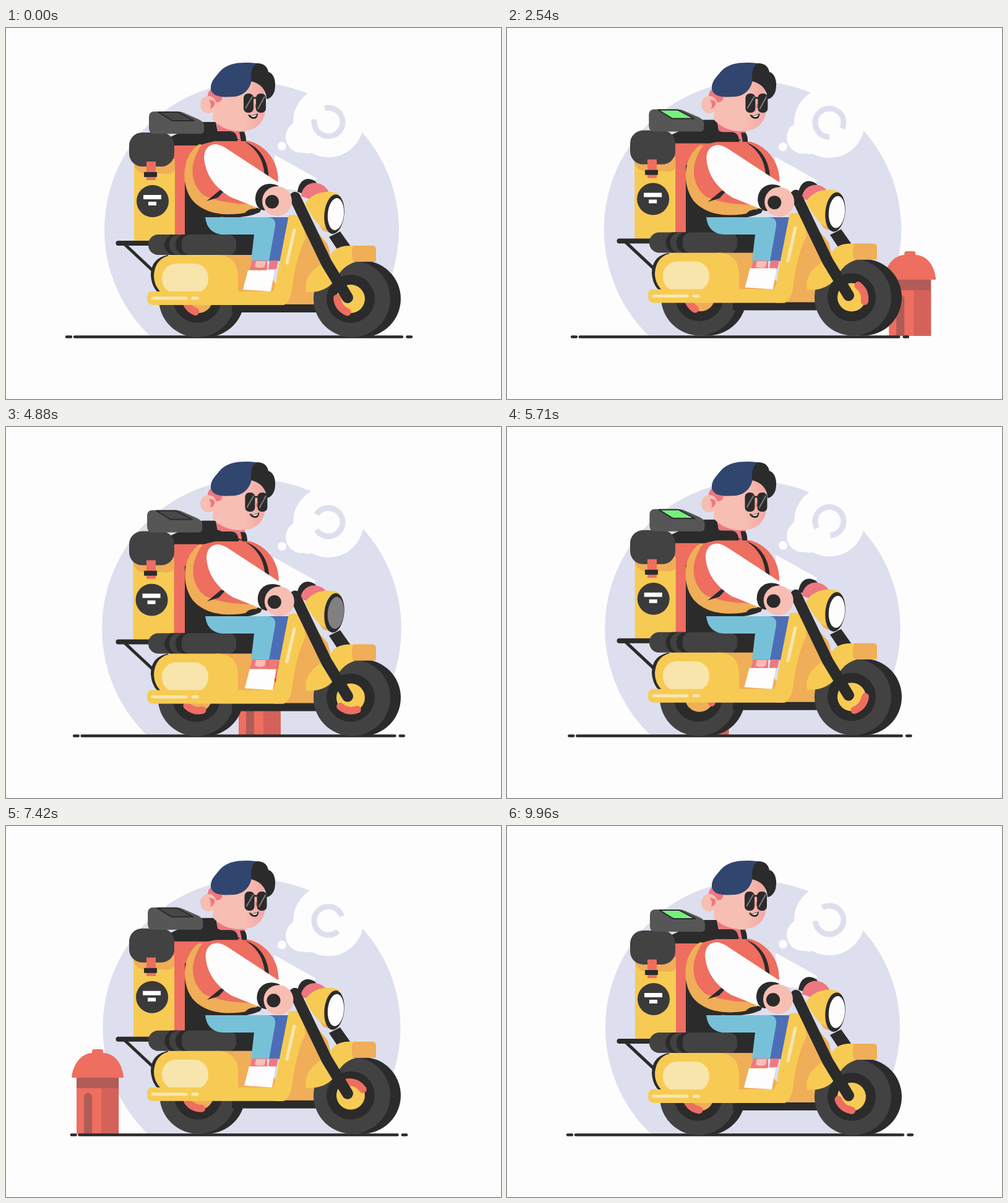
Recreate the animation shown at these times as an HTML page. Size 800 px wide and 600 px high, loop 10000 ms.

```html
<!DOCTYPE html>
<html lang="en">
<head>
<meta charset="utf-8">
<title>Delivery scooter</title>
<style>
  html, body { margin: 0; width: 100%; height: 100%; overflow: hidden; background: #fdfdfd; }
  svg { display: block; width: 100vw; height: 100vh; }
  .bg { fill: #fdfdfd; }
  .halo { fill: #dddfee; }
  .dark { fill: #2b2b2b; }
  .grey { fill: #424242; }
  .yellow { fill: #f7cb53; }
  .orange { fill: #efae57; }
  .pale { fill: #f8e5ab; }
  .red { fill: #ee6e60; }
  .skin { fill: #f7beb3; }
  .blush { fill: #ee7880; }
  .brown { fill: #b05c57; }
  .line { fill: none; stroke: #2b2b2b; stroke-linecap: round; stroke-linejoin: round; }
  .shine { stroke: #f8e7b2; }
  .pad { fill: none; stroke: #ee6e60; stroke-width: 12; stroke-linecap: round; }
</style>
</head>
<body>
<svg viewBox="0 0 800 600">
  <defs>
    <clipPath id="above"><rect width="800" height="499"/></clipPath>
    <linearGradient id="skinTone">
      <stop offset=".6" stop-color="#f7beb3"/>
      <stop offset="1" stop-color="#f3a6a2"/>
    </linearGradient>
  </defs>

  <g clip-path="url(#above)"><circle id="halo" class="halo" cx="397" cy="326" r="238"/></g>
  <g id="bubble">
    <g class="bg">
      <circle cx="521" cy="152" r="57"/>
      <circle cx="478" cy="176" r="26"/>
      <circle cx="488" cy="186" r="17"/>
      <circle cx="446" cy="191" r="7"/>
    </g>
    <circle id="loader" cx="521" cy="152" r="23" fill="none" stroke="#dddfee" stroke-width="9"
      pathLength="360" stroke-dasharray="295 65"/>
  </g>

  <g id="hydrant">
    <rect class="red" y="407" width="68" height="91"/>
    <rect y="424" x="40" width="28" height="74" fill="#d5625a"/>
    <rect class="brown" y="407" width="68" height="17"/>
    <path class="brown" d="M12 498V438a6.500 6.500 0 0 1 13 0V498z"/>
    <path class="red" d="M-8 407C-6 383 10 367 25 367V364q0-3 4-3h10q4 0 4 3v3C60 367 74 383 76 407z"/>
  </g>

  <g id="ground" class="line" stroke-width="4.500">
    <path d="M111 499.500H640M98 499.500H105M648.500 499.500H655"/>
  </g>

  <g id="rearWheel">
    <circle class="dark" cx="323" cy="438" r="62"/>
    <circle class="grey" cx="309" cy="438" r="62"/>
    <circle class="dark" cx="309" cy="438" r="39"/>
    <circle class="orange" cx="311" cy="438" r="23"/>
    <path id="rearPad" class="pad" d="M328 425Q335 438 328 451"/>
  </g>

  <g id="farArm">
    <path class="bg" d="M434 205L502 243L480 264L436 258z"/>
    <path class="dark" d="M471 265C474 243 490 239 502 250L486 270z"/>
    <path class="blush" d="M477 272C479 246 512 243 522 266L500 280z"/>
  </g>

  <g class="bounce">
    <path class="dark" d="M262 178L317 152H339L342 167H372L388 184L330 192H266z"/>
    <rect class="red" x="268" y="190" width="60" height="156"/>
    <g id="crate">
      <rect class="yellow" x="207" y="212" width="66" height="134"/>
      <path class="orange" d="M207 212H273V230Q268 238 254 235H222Q212 234 207 222z"/>
      <circle cx="237" cy="280" r="26" fill="#3a3a3a"/>
      <path class="bg" d="M222 270h29v7h-29zM230 281h13v6h-13z"/>
    </g>
    <rect class="grey" x="199" y="169" width="73" height="55" rx="21"/>
    <rect class="red" x="227" y="216" width="15" height="30"/>
    <rect class="dark" x="223" y="233" width="21" height="8"/>
    <g id="box">
      <path d="M231 144q0-9 9-9h37q6 0 10 2l25 11q8 4 8 10v7q0 6-6 6h-74q-9 0-9-9z" fill="#565656"/>
      <path id="screen" d="M246 136H278L304 150H269z" stroke="#2b2b2b" stroke-width="2" stroke-linejoin="round"/>
    </g>
  </g>

  <g class="bounce">
    <path class="line" d="M181.500 348H238" stroke-width="8"/>
    <path class="line" d="M192 350L238 393" stroke-width="5"/>
    <rect class="dark" x="289" y="225" width="58" height="112"/>
    <rect class="dark" x="270" y="334" width="134" height="34"/>
    <rect class="grey" x="230" y="334" width="70" height="33" rx="16"/>
    <path class="dark" d="M266 334H290V367H266Q246 351 266 334z"/>
    <rect class="grey" x="264" y="334" width="30" height="33" rx="15"/>
    <rect class="dark" x="274" y="334" width="30" height="33" rx="15"/>
    <rect class="grey" x="284" y="334" width="88" height="33" rx="13"/>
    <rect class="dark" x="365" y="446" width="140" height="14"/>
    <path class="orange" d="M340 367H403L440 420V432H340z"/>
    <path class="dark" d="M262 367Q234 372 234 400Q236 424 252 432H270z"/>
    <path class="yellow" d="M270 367H345Q375 370 375 402V432H256Q239 420 239 400Q241 370 270 367z"/>
    <rect class="pale" x="252" y="381" width="75" height="48" rx="23"/>
  </g>

  <g id="torso">
    <path class="dark" d="M290 235L340 305Q385 310 410 298L420 280z"/>
    <path class="orange" d="M312 188C284 206 282 252 300 277C322 304 362 305 396 297L436 270L400 200z"/>
    <path class="red" d="M318 188C350 178 374 180 394 183C424 192 444 222 439 256Q434 272 412 285Q350 286 318 270C288 244 298 208 318 188z"/>
    <path class="orange" d="M312 196C292 228 300 268 340 282C310 284 294 264 291 240Q289 212 312 196z"/>
    <path class="dark" d="M386 184C416 194 428 224 424 258L418 256C420 224 412 200 386 184z"/>
    <path class="dark" d="M324 280L346 262H354L343 274zM386 299Q392 292 402 292L410 298z"/>
  </g>

  <g>
    <path d="M420 306H457L446 377H420z" fill="#4d6eb6"/>
    <path d="M322 306H422Q437 306 435 321L425 377H396L401 334H350Q325 332 322 306z" fill="#77c1d8"/>
    <path class="blush" d="M398 376H422V391H394z"/>
    <path class="skin" d="M404 377H420L418 386Q412 390 402 386z"/>
    <path class="blush" d="M426 376H440L437 390H424z"/>
  </g>

  <g class="bounce">
    <path class="orange" d="M478 300L520 350L530 390L498 425V447H436z"/>
    <path class="yellow" d="M457 303L478 302L484 340Q468 372 462 425Q458 447 445 448H434L430 428Q436 420 438 400z"/>
    <path class="line shine" d="M466 327L454 380" stroke-width="5"/>
    <path class="yellow" d="M233 426H450V448H237Q228 448 228 437Q228 429 233 426z"/>
    <path class="line shine" d="M237 437H291M302 437H309" stroke-width="5"/>
    <path id="shoe" class="bg" d="M391 392H434L428 426L383 423z"/>
  </g>

  <g id="frontWheel">
    <circle class="dark" cx="576" cy="438" r="62"/>
    <circle class="grey" cx="559" cy="438" r="62"/>
    <circle class="dark" cx="557" cy="438" r="39"/>
    <circle class="yellow" cx="557" cy="438" r="23"/>
    <path id="frontPad" class="pad" d="M574 424Q582 438 574 452"/>
  </g>

  <g class="bounce">
    <path class="dark" d="M522 338L540 329L557 353L538 362z"/>
    <path class="yellow" d="M485 427C481 400 500 388 515 378L530 360Q540 351 560 352L590 352V378H566C538 386 538 404 524 416Q510 428 485 427z"/>
    <path class="orange" d="M561 378Q556 360 562 352H592Q598 352 598 358V378z"/>
    <path class="orange" d="M484 284L536 268L540 324Q530 336 512 327z"/>
    <path class="yellow" d="M483 285C494 266 520 260 539 269L516 325Q500 318 483 285z"/>
    <ellipse class="dark" cx="530.500" cy="301" rx="16" ry="32" transform="rotate(6 530 301)"/>
    <ellipse id="lamp" cx="533" cy="301" rx="13" ry="26" transform="rotate(5 533 301)"/>
    <path class="line" d="M467 274L518 380L552 436" stroke-width="18"/>
  </g>

  <g id="arm">
    <path class="bg" d="M320 208Q322 188 340 188Q348 189 358 196L442 251L414 294L362 273Q322 248 320 208z"/>
    <path class="dark" d="M440 255C420 246 402 258 403 278Q405 294 418 295z"/>
    <circle class="skin" cx="438" cy="280" r="24"/>
    <circle class="dark" cx="430" cy="281" r="11"/>
  </g>

  <path class="blush" d="M340 152H386V170L380 182L342 166z"/>
  <path id="collar" class="dark" d="M331 167H361Q374 167 374 183H331zM377 168H384Q388 171 388 183H380z"/>
  <path class="blush" d="M326 116Q324 98 340 96L372 98V122H336z"/>
  <path d="M350 110L396 82L412 86Q421 104 419 132C417 156 402 167 378 167Q352 167 334 148L336 120Q350 122 350 110z" fill="url(#skinTone)"/>
  <ellipse class="skin" cx="327" cy="124" rx="13" ry="14"/>
  <path class="blush" d="M328 116Q339 117 337 124Q335 129 330 131Q333 124 328 116z"/>
  <path d="M406 57C386 55 360 54 346 70C338 80 330 86 331 99C334 113 354 112 370 111C390 108 398 92 398 74z" fill="#31466f"/>
  <path class="dark" d="M406 57Q421 57 424 71C434 74 437 88 434 102Q430 114 421 115Q420 92 396 86C396 72 396 62 406 57z"/>

  <g id="face">
    <path class="red" d="M402 122q6 5 0 8z"/>
    <path class="line" d="M394 113H410" stroke-width="3"/>
    <rect class="dark" x="384" y="106" width="16" height="31" rx="7"/>
    <rect class="dark" x="404" y="106" width="16" height="31" rx="7"/>
    <path id="glint" d="M387 130L398 111M407 131L418 111" stroke-width="2" fill="none"/>
    <path class="dark" d="M391 140Q400 143 407 138Q407 147 400 147Q393 146 391 140z"/>
    <path class="bg" d="M394 141Q400 143 405 140Q404 144 399 144z"/>
  </g>
</svg>
<script>
  const $ = id => document.getElementById(id);
  const bouncing = document.querySelectorAll('.bounce');
  const wave = (t, period) => (1 - Math.cos(2 * Math.PI * t / period)) / 2;
  const ramp = (t, from, to) => Math.min(1, Math.max(0, (t - from) / (to - from)));
  const set = (id, name, value) => $(id).setAttribute(name, value);
  const move = (id, x, y) => set(id, 'transform', `translate(${x} ${y})`);
  const spin = (id, angle, x, y) => set(id, 'transform', `rotate(${angle} ${x} ${y})`);
  const mix = (a, b, k) => `rgb(${a.map((v, i) => v + (b[i] - v) * k)})`;

  function draw(t) {
    const sway = wave(t, 2000);
    const hop = wave(t, 1000);
    const lift = -3.5 * hop;
    const kick = Math.max(0, 2 * hop - 1) ** 2;

    set('halo', 'r', 238 + 4 * sway);
    const squeeze = 1 - 0.045 * sway;
    set('ground', 'transform', `matrix(${squeeze} 0 0 1 ${376.5 * (1 - squeeze)} 0)`);
    move('bubble', 0, 2 * sway);
    spin('loader', 255 + 0.36 * t, 521, 152);
    move('hydrant', 879.2 - 0.1031 * t, 0);

    bouncing.forEach(g => g.setAttribute('transform', `translate(0 ${lift})`));
    move('crate', -1.5 * sway, 0);
    move('box', -3 * sway, 0);
    move('rearWheel', 3 * kick - 1.5 * sway, -3 * kick);
    move('frontWheel', 0, -2.5 * hop);
    spin('rearPad', 140 + 0.288 * t, 311, 438);
    spin('frontPad', 143 + 0.36 * t, 557, 438);

    move('torso', sway, 2 * sway);
    move('collar', 2 * sway, 2 * sway);
    move('arm', 4 * sway, 2 * sway);
    move('farArm', -sway, 6 * sway);
    move('shoe', 3 * sway, 0);
    move('face', 2.5 * sway, 0);

    const beat = t % 2000;
    const dim = ramp(beat, 600, 840) - ramp(beat, 900, 1170);
    set('lamp', 'fill', mix([253, 253, 253], [128, 128, 128], dim));
    const shine = ramp(beat, 920, 1040) - ramp(beat, 1080, 1240);
    set('glint', 'stroke', mix([125, 125, 125], [247, 222, 130], shine));
    const screenOn = t % (2000 / 3) >= 1000 / 3 - 10;
    set('screen', 'fill', screenOn ? '#76f07c' : '#484848');
  }

  function frame(now) {
    draw(now % 10000);
    requestAnimationFrame(frame);
  }
  draw(0);
  requestAnimationFrame(frame);
</script>
</body>
</html>
```
